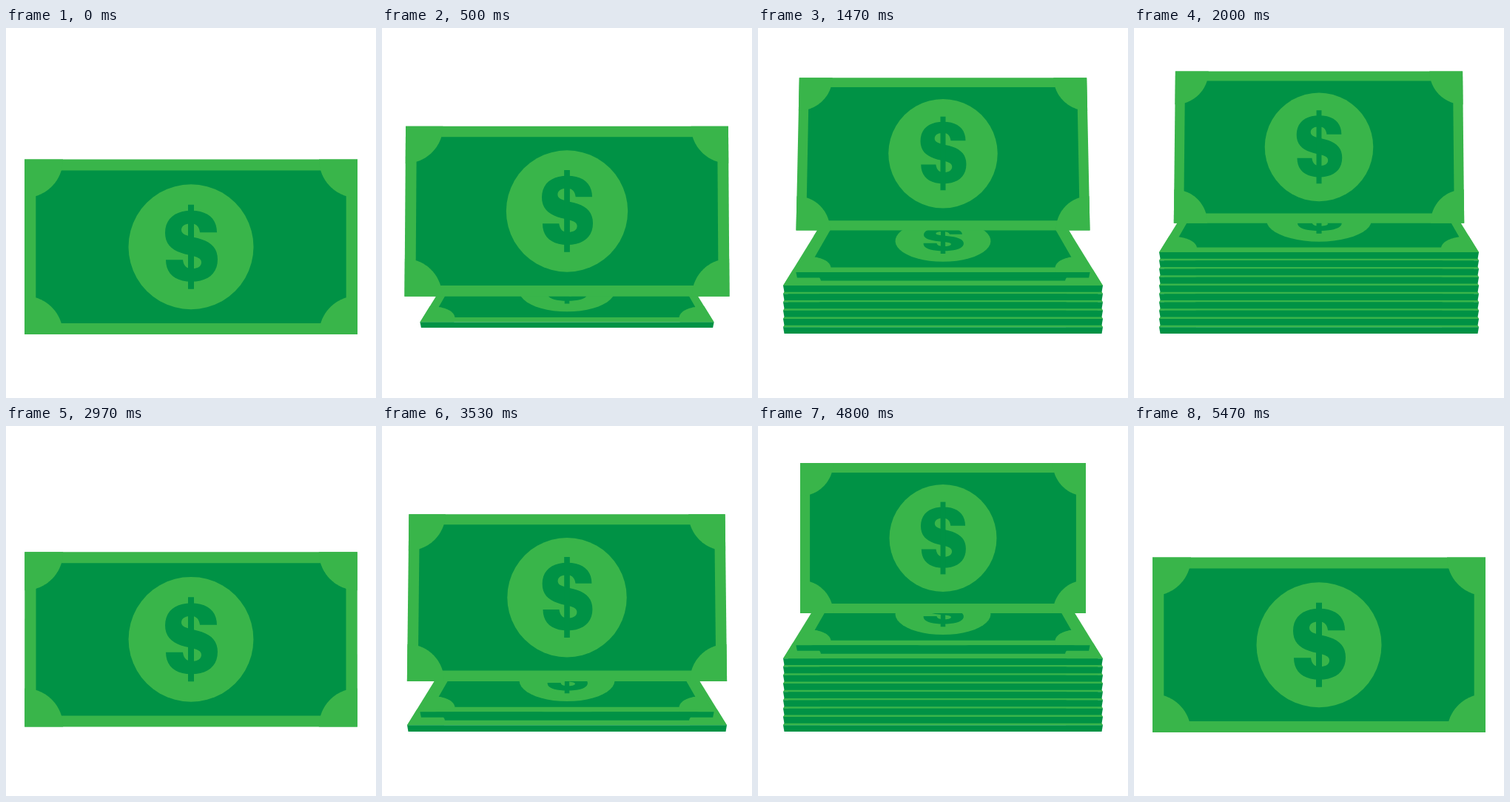
Recreate the animation shown at these times as an HTML page with a canvas. Size 500x500 px, loop 5.73 s.

```html
<!DOCTYPE html>
<html lang="en">
<head>
<meta charset="utf-8">
<title>Stacking banknotes</title>
<style>
  html, body { margin: 0; width: 100%; height: 100%; overflow: hidden; background: #fff; }
  canvas { display: block; width: 500px; height: 500px; }
</style>
</head>
<body>
<canvas id="stage" width="500" height="500"></canvas>
<script>
const ctx = document.getElementById('stage').getContext('2d');
const LIGHT = '#39b54a', DARK = '#009245';
const LOOP = 5730, CYCLE = 36, TOP_STEP = 24, END_STEP = 32, LAYERS = 10;
const W = 225, H = 118.25; // half size of a note
const Q = Math.PI / 2;

function arc(cx, cy, r, from, to) {
  return Array.from({ length: 49 }, (_, i) => {
    const a = from + (to - from) * i / 48;
    return [cx + r * Math.cos(a), cy + r * Math.sin(a)];
  });
}

function box(x, y) {
  return [[-x, -y], [x, -y], [x, y], [-x, y]];
}

// Each row holds two control points and an end point of a cubic curve.
function curves(start, rows) {
  const pts = [start];
  let [x0, y0] = start;
  for (const [x1, y1, x2, y2, x3, y3] of rows) {
    for (let i = 1; i <= 10; i++) {
      const t = i / 10, u = 1 - t;
      const mix = (a, b, c, d) => u * u * u * a + 3 * u * u * t * b + 3 * u * t * t * c + t * t * t * d;
      pts.push([mix(x0, x1, x2, x3), mix(y0, y1, y2, y3)]);
    }
    [x0, y0] = [x3, y3];
  }
  return pts;
}

// The S is one outline plus its half turn.
const halfS = curves([11.5, -18.5], [
  [10.5, -26, 7, -30.5, -0.5, -30.5],
  [-9, -30.5, -13.5, -27, -13.5, -22],
  [-13.5, -16.5, -8, -14.5, 3, -12],
  [23, -8, 35.5, 0, 35.5, 18],
  [35.5, 37, 22, 48, 0, 48],
  [-22, 48, -34.5, 37, -34.5, 18.5]
]);
const S = [...halfS, ...halfS.map(([x, y]) => [-x, -y])].map(([x, y]) => [x + 0.5, y - 1]);

const corners = box(W, H).map(([x, y], n) => [[x, y], ...arc(x, y, 52, n * Q, (n + 1) * Q)]);

const NOTE = [
  [LIGHT, box(W, H)],
  [DARK, box(W - 15.3, H - 15)],
  ...corners.map(c => [LIGHT, c]),
  [LIGHT, arc(0, 0, 84.5, 0, 4 * Q)],
  [DARK, S],
  [DARK, box(4, 57)]
];

function fill(color, pts) {
  ctx.fillStyle = color;
  ctx.beginPath();
  for (const [x, y] of pts) ctx.lineTo(x, y);
  ctx.closePath();
  ctx.fill();
}

// Projects the note onto a trapezoid that narrows upwards.
function drawNote(half, bottom, height, taper) {
  const project = ([x, y]) => {
    const v = (H - y) / (2 * H), s = 1 / (1 + taper * v);
    return [250 + x / W * half * s, bottom - height * v * (1 + taper) * s];
  };
  for (const [color, pts] of NOTE) fill(color, pts.map(project));
}

// A lying note; far is 0 once it has landed.
function drawFlat(n, far) {
  const scale = 1 - 0.0805 * far, taper = 0.3 + 0.026 * far;
  const y = 404.3 - 11.25 * (n - 1) - 6.7 * far;
  const half = 216 * scale, edge = 8.8 * scale ** 2;
  drawNote(half, y, 350 * scale * taper / (1 + taper), taper);
  fill(DARK, [[250 - half, y], [250 + half, y],
    [250 + half - 1.5, y + edge], [250 - half + 1.5, y + edge]]);
}

function drawStanding(k) {
  let lift, shrink, taper;
  if (k <= TOP_STEP) {
    const t = k / TOP_STEP, u = 1 - (1 - t) ** 1.16;
    lift = t + 0.7 * t ** 1.33 * (1 - t);
    shrink = u * u * (3 - 2 * u);
    taper = 0.158 * t * t * (1 - t);
  } else {
    const t = (k - TOP_STEP) / (END_STEP - TOP_STEP);
    lift = shrink = 1 - t ** 1.3;
    taper = 0.1 * t * (1 - t);
  }
  const half = W - 32 * shrink, height = 2 * H * half / W;
  drawNote(half * (1 + taper / 2), 295.75 - 144.25 * lift + height / 2, height, taper);
}

function draw(step) {
  const k = step < END_STEP ? step : 0;
  ctx.fillStyle = '#fff';
  ctx.fillRect(0, 0, 500, 500);
  for (let n = 1; n <= LAYERS; n++) {
    const left = 2 * n + 5 - k; // steps until this note lands
    if (left <= 2) drawFlat(n, Math.max(left, 0) ** 1.65);
  }
  drawStanding(k);
}

// Steps of 80 ms, held to a 30 fps clock.
const startOf = k => Math.round(Math.ceil(2.4 * k - 1e-6) * 10 / 3) * 10;

function stepAt(t) {
  const k = Math.floor(t / 80);
  return (startOf(k) > t ? k - 1 : k) % CYCLE;
}

const begin = performance.now();
let shown = -1;
function tick() {
  const step = stepAt((performance.now() - begin) % LOOP);
  if (step !== shown) draw(shown = step);
  requestAnimationFrame(tick);
}
tick();
</script>
</body>
</html>
```
